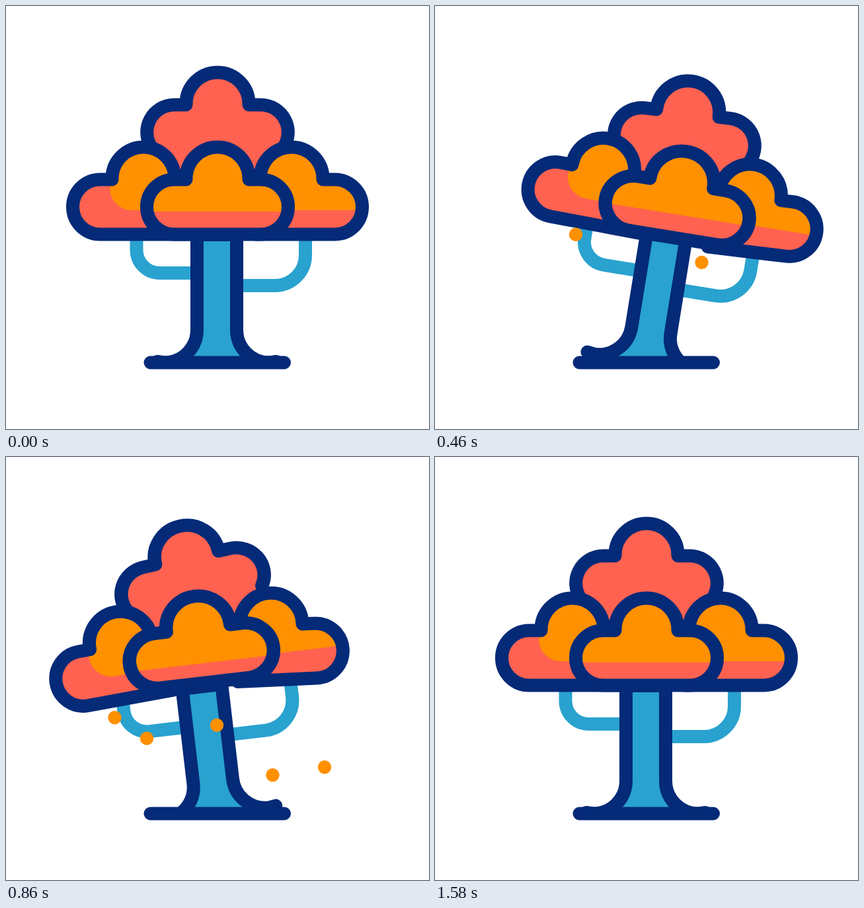
These frames come from a looping animation (640 px wide and 640 px high, 2400 ms). An HTML page:

```html
<!DOCTYPE html>
<html lang="en">
<head>
<meta charset="utf-8">
<title>Swaying tree</title>
<style>
  html, body { margin: 0; width: 100%; height: 100%; overflow: hidden; background: #fff; }
  svg { display: block; width: 100%; height: 100%; }
  .line { fill: none; stroke: #042a78; stroke-width: 20; stroke-linecap: round; stroke-linejoin: round; }
  .branch { fill: none; stroke: #29a2cf; stroke-width: 20; }
  .coral { fill: #ff6250; }
  .orange { fill: #ff9000; }
  .blue { fill: #29a2cf; }
</style>
</head>
<body>
<svg viewBox="0 0 640 640">
  <defs>
    <path id="trunkShape" d="M229 538L239.5 539.5A49.5 49.5 0 0 0 289 490V346H349V490A49.5 49.5 0 0 0 398.5 539.5L409 538"/>
    <path id="leftShape" d="M285 345.5H142.5A41.5 41.5 0 0 1 142.5 262.5H160.5V261A47.5 47.5 0 0 1 255.5 261V300"/>
    <path id="rightShape" d="M378 345.5H497.5A41.5 41.5 0 0 0 497.5 262.5H479.5V261A47.5 47.5 0 0 0 384.5 261V300"/>
    <path id="frontShape" d="M254.5 345.5A41.5 41.5 0 0 1 254.5 262.5H272.5V261A47.5 47.5 0 0 1 367.5 261V262.5H385.5A41.5 41.5 0 0 1 385.5 345.5Z"/>
    <path id="topShape" d="M220.5 214.5A41.5 41.5 0 0 1 254.5 149.5H272.5V148A47.5 47.5 0 0 1 367.5 148V149.5H385.5A41.5 41.5 0 0 1 419.5 214.5"/>
    <clipPath id="ground"><rect width="640" height="540"/></clipPath>
    <clipPath id="rightClip"><use class="right" href="#rightShape"/></clipPath>
    <clipPath id="frontClip"><use class="front" href="#frontShape"/></clipPath>
  </defs>

  <g clip-path="url(#ground)">
    <g id="tree">
      <path class="branch" d="M197.5 340V369A35 35 0 0 0 232.5 404H289"/>
      <path class="branch" d="M453 340V377A46 46 0 0 1 407 423H349"/>
      <use href="#trunkShape" class="blue"/>
      <use href="#trunkShape" class="line"/>
      <g class="top">
        <path class="coral" d="M220 214L240 270H400L420 214Z"/>
        <use href="#topShape" class="coral"/>
        <use href="#topShape" class="line"/>
      </g>
      <g class="left">
        <use href="#leftShape" class="coral"/>
        <path class="orange" d="M157 264V276A33 33 0 0 0 190 309H255.5V261A47.5 47.5 0 0 0 160.5 261Z"/>
        <use href="#leftShape" class="line"/>
      </g>
      <!-- The colour edge of these two keeps the tree's tilt, not the cloud's. -->
      <g class="right"><use href="#rightShape" class="coral"/></g>
      <g clip-path="url(#rightClip)"><rect class="orange" x="340" y="180" width="240" height="129"/></g>
      <g class="right"><use href="#rightShape" class="line"/></g>
      <g class="front"><use href="#frontShape" class="coral"/></g>
      <g clip-path="url(#frontClip)"><rect class="orange" x="180" y="180" width="280" height="131"/></g>
      <g class="front"><use href="#frontShape" class="line"/></g>
    </g>
  </g>
  <g id="fruits"></g>
  <path class="line" d="M218.5 539.5H421"/>
</svg>
<script>
const LOOP = 2400, GROUND = 540;
const clamp = v => Math.max(0, Math.min(1, v));
const ease = (t, from, to) => (1 - Math.cos(Math.PI * clamp((t - from) / (to - from)))) / 2;
const pulse = (t, from, peak, to) => ease(t, from, peak) - ease(t, peak, to);

const sway = t => 9.6 * ease(t, 0, 406) - 18.9 * ease(t, 406, 1006) + 9.3 * ease(t, 1006, 1408);

// Follow-through: each cloud's pose on the swing right and on the swing back.
const CLOUDS = [
  { name: "top", x: 320, y: 190,
    out: { dx: 4, dy: 12, rot: -3, wide: 0 }, back: { dx: 4, dy: 0, rot: -7, wide: .035 } },
  { name: "left", x: 250, y: 350,
    out: { dx: -3, dy: 2.5, rot: 2.6, wide: 0 }, back: { dx: 3, dy: 2.5, rot: -4.7, wide: 0 } },
  { name: "right", x: 390, y: 350,
    out: { dx: 9, dy: 9, rot: -4, wide: 0 }, back: { dx: -5.5, dy: .5, rot: 5.2, wide: 0 } },
  { name: "front", x: 320, y: 304,
    out: { dx: 14, dy: 2, rot: 0, wide: .04 }, back: { dx: 5, dy: -6, rot: 0, wide: .03 } }
];
for (const c of CLOUDS) c.parts = document.querySelectorAll("." + c.name);

// Fruits drop one after another, each at a steady speed: x, height at 860 ms, px/ms.
const FRUITS = [
  [213, 425.5, .2],
  [403.5, 481, .233],
  [482, 469, .219],
  [319, 405.5, .198],
  [164.5, 394, .246]
].map(([x, y, speed], i) => {
  const el = document.createElementNS("http://www.w3.org/2000/svg", "circle");
  el.setAttribute("class", "orange");
  el.setAttribute("cx", x);
  document.getElementById("fruits").append(el);
  return { el, speed, born: 345 + 80 * i, lands: 860 + (GROUND - y) / speed };
});

const tree = document.getElementById("tree");

function draw(t) {
  tree.setAttribute("transform", `rotate(${sway(t)} 320 ${GROUND})`);

  const a = pulse(t, 0, 320, 660), b = pulse(t, 420, 720, 1180);
  for (const { x, y, out, back, parts } of CLOUDS) {
    const mix = key => a * out[key] + b * back[key];
    const pose = `translate(${x + mix("dx")} ${y + mix("dy")}) rotate(${mix("rot")}) ` +
      `scale(${1 + mix("wide")} 1) translate(${-x} ${-y})`;
    for (const part of parts) part.setAttribute("transform", pose);
  }

  for (const { el, speed, born, lands } of FRUITS) {
    el.setAttribute("cy", GROUND - speed * (lands - t));
    el.setAttribute("r", 10.2 * clamp((t - born) / 35));
    el.setAttribute("opacity", clamp((lands - t) / 80));
  }
}

const start = performance.now();
function tick() {
  draw((performance.now() - start) % LOOP);
  requestAnimationFrame(tick);
}
tick();
</script>
</body>
</html>
```
